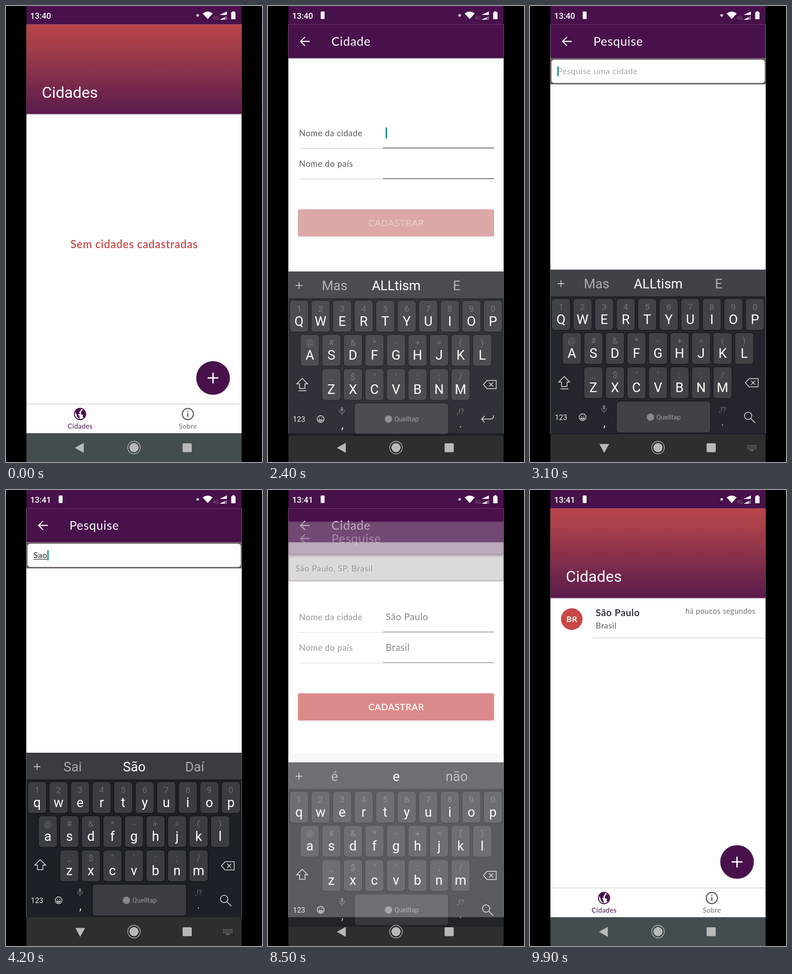
Write an HTML page with a canvas that moves like this. It is 561 by 998 pixels and loops after 10000 ms.

```html
<!DOCTYPE html>
<html lang="pt-BR">
<head>
<meta charset="utf-8">
<title>Cidades</title>
<style>
html, body { margin: 0; width: 100%; height: 100%; overflow: hidden; background: #000; }
canvas { display: block; }
</style>
</head>
<body>
<canvas id="stage" width="561" height="998"></canvas>
<script>
const stage = document.getElementById('stage').getContext('2d');
const keyboardCanvas = new OffscreenCanvas(561, 998);
const keyboardCtx = keyboardCanvas.getContext('2d');
let ctx = stage;

const LOOP = 10000, LEFT = 44.5, WIDTH = 472;
const PURPLE = '#48114b', RED = '#c84846', INK = '#5d585c', TEAL = '#0c8a86', WHITE = '#fefefe';
const LATO = 'Lato, sans-serif', ROBOTO = 'Roboto, sans-serif';

const clamp = v => Math.max(0, Math.min(1, v));
const span = (t, start, length) => clamp((t - start) / length);
const easeOut = (x, power) => 1 - (1 - x) ** power;

function rect(x, y, w, h, color, radius = 0) {
  ctx.fillStyle = color;
  ctx.beginPath();
  ctx.roundRect(x, y, w, h, radius);
  ctx.fill();
}
function disc(x, y, r, color) {
  ctx.fillStyle = color;
  ctx.beginPath();
  ctx.arc(x, y, r, 0, 7);
  ctx.fill();
}
function fillPath(d, color) {
  ctx.fillStyle = color;
  ctx.fill(new Path2D(d));
}
function strokePath(d, color, width) {
  ctx.strokeStyle = color;
  ctx.lineWidth = width;
  ctx.stroke(new Path2D(d));
}
function ring(x, y, r, color, width) {
  ctx.strokeStyle = color;
  ctx.lineWidth = width;
  ctx.beginPath();
  ctx.arc(x, y, r, 0, 7);
  ctx.stroke();
}
function text(str, x, y, size, color, { font = LATO, weight = 400, align = 'left' } = {}) {
  ctx.font = `${weight} ${size}px ${font}`;
  ctx.letterSpacing = font === LATO ? `${size * 0.03}px` : '0px';
  ctx.textAlign = align;
  ctx.fillStyle = color;
  ctx.fillText(str, x, y);
  return ctx.measureText(str).width;
}
const key = (str, x, y, size, color) => text(str, x, y, size, color, { font: ROBOTO, align: 'center' });

function statusBar(t) {
  rect(LEFT, 0, WIDTH, 40.5, PURPLE);
  text(t < 3700 ? '13:40' : '13:41', 53, 27.5, 18, '#fff', { font: ROBOTO, weight: 500 });
  if (t >= 300) rect(115.5, 12, 8.5, 16.5, '#fff', 1.5);
  disc(420, 20.5, 2.7, '#fff');
  fillPath('M431 16.5Q442 8 453 16.5L442 28.5Z', '#fff');
  text('4G', 453, 30, 11, '#80597f', { font: ROBOTO });
  fillPath('M468 19.5L484 12V19.5Z M468 30L479 24.5V30Z', '#fff');
  fillPath('M479 24.5L484 22V30H479Z', '#8f6f91');
  rect(493.5, 13.5, 9.5, 15.5, '#fff', 1);
  rect(496, 11.5, 4.5, 3, '#fff');
}

function navBar(dark) {
  rect(LEFT, 935, WIDTH, 63, dark ? '#2d2f2e' : '#434d4f');
}
function navIcons(typing) {
  const gray = '#b7b9b9';
  fillPath(typing ? 'M152 958.5H173.5L162.5 978Z' : 'M151 967L170.5 956V978Z', gray);
  ring(280.5, 966.5, 13.8, gray, 1.4);
  disc(280.5, 966.5, 10, gray);
  rect(387, 957, 20, 19.5, gray, 2);
  if (!typing) return;
  for (let row = 0; row < 3; row++)
    for (let col = 0; col < 6; col++)
      rect(476 + col * 3.6, 961 + row * 3.6, 2, 2, '#7f8282');
  rect(482, 971.5, 8, 2, '#7f8282');
}

function home(saved) {
  rect(LEFT, 40, WIDTH, 895, WHITE);
  const sky = ctx.createLinearGradient(0, 40, 0, 237);
  sky.addColorStop(0, '#b84549');
  sky.addColorStop(0.2, '#a94049');
  sky.addColorStop(1, '#591b4d');
  rect(LEFT, 40.5, WIDTH, 196, sky);
  rect(LEFT, 236.5, WIDTH, 1.2, '#b9adb9');
  text('Cidades', 78.5, 200.5, 34, '#fff', { font: ROBOTO });

  if (saved) {
    disc(91.5, 282.5, 23.7, RED);
    text('BR', 91.8, 288.7, 17.8, '#fff', { weight: 700, align: 'center' });
    text('São Paulo', 144, 275.7, 21, '#222028', { weight: 600 });
    text('Brasil', 144, 303.3, 17.7, INK);
    text('há poucos segundos', 494, 271.2, 16.3, '#777277', { align: 'right' });
    rect(138, 323, 378.5, 1.3, '#d0d0d0');
  } else {
    text('Sem cidades cadastradas', 280.8, 529.7, 24, RED, { weight: 600, align: 'center' });
  }

  disc(454, 815, 37.2, 'rgba(0,0,0,.15)');
  disc(453.7, 814, 36.8, PURPLE);
  strokePath('M442 814H465.5M453.7 802.5V826', '#fff', 3);

  rect(LEFT, 870.3, WIDTH, 1.3, '#cbcbcb');
  ring(162.3, 893, 12.3, PURPLE, 2.2);
  fillPath('M151 887L157 881L165 882L163 887L160 889L163 892L158 893L161 898L162 905L156 899L154 893Z'
    + 'M167 884L172 886L174 894L171 901L168 900L169 895L165 894L164 890Z', PURPLE);
  text('Cidades', 162.5, 924.8, 14.9, PURPLE, { align: 'center' });
  ring(398.5, 893, 12.2, INK, 2.4);
  rect(397.2, 891.5, 2.6, 8, INK);
  rect(397.2, 886.5, 2.6, 2.8, INK);
  text('Sobre', 398.7, 924.8, 14.9, '#777277', { align: 'center' });
}

function header(title) {
  rect(LEFT, 40.5, WIDTH, 74, PURPLE);
  strokePath('M91.5 77.5H72M81 68L71.5 77.5L81 87', '#fff', 2.4);
  text(title, 139, 87.3, 26.6, '#fff');
}

function formField(label, value, y) {
  text(label, 68, y, 18.5, INK);
  rect(68, y + 26, 184, 1.2, '#cfcdcf');
  rect(252, y + 24.7, 243.5, 2, '#777177');
  text(value, 258, y - 0.5, 20.4, '#454046');
}
function form(t) {
  const filled = t >= 7600;
  rect(LEFT, 40.5, WIDTH, 895, WHITE);
  if (t > 2500 && t < 8600) rect(LEFT, 576, WIDTH, 359, '#f4f4f4');
  header('Cidade');
  rect(LEFT, 114.5, WIDTH, 1.5, '#d9d3d9');
  formField('Nome da cidade', filled ? 'São Paulo' : '', 285);
  formField('Nome do país', filled ? 'Brasil' : '', 352);
  if (t >= 2200 && t < 2600) rect(257.8, 266, 3, 24, TEAL);
  rect(65.5, 445, 430, 59.5, filled ? RED : '#dba8a7', 3);
  text('CADASTRAR', 281, 481.7, 19.9, filled ? '#fff' : '#e8c8c7', { weight: 600, align: 'center' });
}

const entries = [
  [0, ''], [3700, 'S'], [4000, 'Sa'], [4200, 'Sao'],
  [4600, 'São '], [5300, 'São Paulo '], [7500, 'São Paulo, SP, Brasil']
];
const results = [
  'São Paulo, SP, Brasil', 'São Paulo do Potengi, RN, Brasil', 'São Paulo de Olivença, AM, Brasil',
  'São Paulo das Missões, São Paulo das MissõEs - RS…', 'São Paulo, Portugal'
];
const latest = (list, t) => list.findLast(([start]) => t >= start);

function search(t, settled) {
  rect(LEFT, 40.5, WIDTH, 535, WHITE);
  if (!settled) {
    ctx.strokeStyle = 'rgba(0,0,0,.2)';
    ctx.lineWidth = 3.5;
    ctx.strokeRect(46.5, 43, 468, 69);
  }
  header('Pesquise');
  rect(LEFT, 114.5, WIDTH, 57, '#645c60');
  rect(47, 117.5, 467.5, 51, WHITE, 6);

  const [since, value] = latest(entries, t);
  const width = text(value, 60, 149, 18.2, '#2b272d');
  if (!value) text('Pesquise uma cidade', 60, 149, 18.2, '#a8a6a8');
  if (t >= 3700 && t < 4600) rect(60, 151, width, 1.3, '#2b272d');
  const blinkOn = Math.floor((t - Math.max(since, 3000)) / 500) % 2 === 0;
  if (settled && t < 8400 && blinkOn) rect(60 + width, 132, 2.6, 22, TEAL);

  if (t < 6400 || t >= 7500) return;
  results.forEach((place, i) => {
    const y = 206 + i * 58.4;
    text(place, 61.5, y, 17.9, INK);
    if (i < 4) rect(LEFT, y + 24, WIDTH, 1.3, '#dcdcdc');
  });
  text('powered by', 310, 498.7, 19.6, '#716d72');
  disc(432, 492, 8, '#4285f4');
  text('Obrelo', 443, 498.7, 17.5, '#4285f4');
}

const suggestions = [
  [0, ['Mas', 'ALLtism', 'E']], [3700, ['Se', 'Só', 'Sim']], [4000, ['Sai', 'Sa', 'Dá']],
  [4200, ['Sai', 'São', 'Daí']], [4600, ['José', 'Paulo', 'João']], [5300, ['é', 'e', 'não']]
];
const keyRows = [
  ['qwertyuiop', '1234567890', 68, 639],
  ['asdfghjkl', '@#&*-+=()', 91.7, 713.5],
  ['zxcvbnm', '_$"\':;/', 138.8, 788.5]
];
function keyCap(x, y, w) {
  rect(x - 1.2, y - 1.2, w + 2.4, 70.4, '#0d1014', 7);
  rect(x, y, w, 68, '#3a3d41', 6);
}
function keyboard(t) {
  const upper = t < 3700, hint = '#696c70', light = '#e8e9ea';
  rect(LEFT, 575, WIDTH, 360, '#1c2027');
  rect(LEFT, 575, WIDTH, 59, '#393c40');
  rect(LEFT, 633.5, WIDTH, 1.5, '#14171b');
  strokePath('M60.5 605.5H75.5M68 598V613', light, 1.4);
  latest(suggestions, t)[1].forEach((word, i) =>
    key(word, [146, 281, 413.5][i], 615.5, 29, i === 1 ? '#fff' : '#a9abad'));

  for (const [letters, hints, x0, y] of keyRows)
    [...letters].forEach((letter, i) => {
      const x = x0 + i * 47.2;
      keyCap(x - 20, y, 40);
      key(hints[i], x, y + 23.5, 19, hint);
      key(upper ? letter.toUpperCase() : letter, x, y + 54.5, 29, '#fff');
    });

  strokePath('M75 809L87 821H81V831H69V821H63Z' + (upper ? 'M67 836H84' : ''), light, 1.5);
  strokePath('M472 822.5L480 813.5H500V831.5H480ZM484.5 818L493.5 827M493.5 818L484.5 827', light, 1.5);

  key('123', 68, 904, 16, light);
  ring(115.3, 898, 7.5, light, 1.3);
  strokePath('M111 900Q115.3 906 119.6 900Z', light, 1.3);
  disc(112.7, 896, 1, light);
  disc(118, 896, 1, light);
  rect(159.5, 871.5, 5, 10, hint, 2.5);
  strokePath('M156.5 878Q156.5 885 162 885T167.5 878M162 885V889', hint, 1.4);
  key(',', 163, 919, 26, light);
  key(',!?', 422, 887, 17, hint);
  key('.', 422, 916, 20, light);
  keyCap(190, 863.5, 205);
  disc(264, 898, 8, '#85888b');
  text('Quelltap', 277, 903, 14.5, '#96999c', { font: ROBOTO });
  if (t < 2900) {
    strokePath('M494 890Q495 898 488 898H468M475 891L468 898L475 905', light, 1.5);
  } else {
    ring(478, 895, 8, light, 1.5);
    strokePath('M484 901L493.5 910.5', light, 1.6);
  }
}

// The keyboard fades as one flat picture, unlike the pages.
function keyboardPicture(t) {
  ctx = keyboardCtx;
  ctx.clearRect(0, 0, 561, 998);
  keyboard(t);
  ctx = stage;
  return keyboardCanvas;
}

// Pages fade in while rising by 8% of the height.
function pageProgress(t, opened, closed) {
  return t < closed ? easeOut(span(t, opened, 350), 5) : 1 - span(t, closed, 150);
}
function pageOpacity(p) {
  if (p < 0.5) return p / 2;
  if (p < 0.9) return 0.25 + (p - 0.5) * 1.125;
  return 0.7 + (p - 0.9) * 3;
}
function layer(opacity, dy, draw) {
  if (opacity <= 0) return;
  ctx.save();
  ctx.globalAlpha = opacity;
  ctx.translate(0, dy);
  draw();
  ctx.restore();
}
function keyboardShown(t) {
  if (t < 2600) return easeOut(span(t, 2260, 250), 3);
  if (t < 2900) return 1 - span(t, 2600, 250);
  if (t < 8430) return easeOut(span(t, 2930, 250), 3);
  return 1 - span(t, 8430, 250);
}

function render(t) {
  rect(0, 0, 561, 998, '#000');
  const formIn = pageProgress(t, 1000, 9450);
  const searchIn = pageProgress(t, 2550, 8440);
  const shown = keyboardShown(t);

  ctx.save();
  ctx.beginPath();
  ctx.rect(LEFT, 0, WIDTH, 998);
  ctx.clip();
  home(t >= 9300);
  layer(pageOpacity(formIn), (1 - formIn) * 72, () => form(t));
  layer(pageOpacity(searchIn), (1 - searchIn) * 72, () => search(t, searchIn > 0.99));
  statusBar(t);
  navBar(shown > 0 || (t > 2200 && t < 8700));
  const drop = Math.round((1 - shown) * 75);
  layer(shown, drop, () => ctx.drawImage(keyboardPicture(t), 0, 0));
  navIcons(t >= 3000 && t < 8430);
  ctx.restore();
}

const start = performance.now();
function tick() {
  const t = (performance.now() - start) % LOOP;
  render(Math.floor(t / 100) * 100);
  requestAnimationFrame(tick);
}
tick();
</script>
</body>
</html>
```
